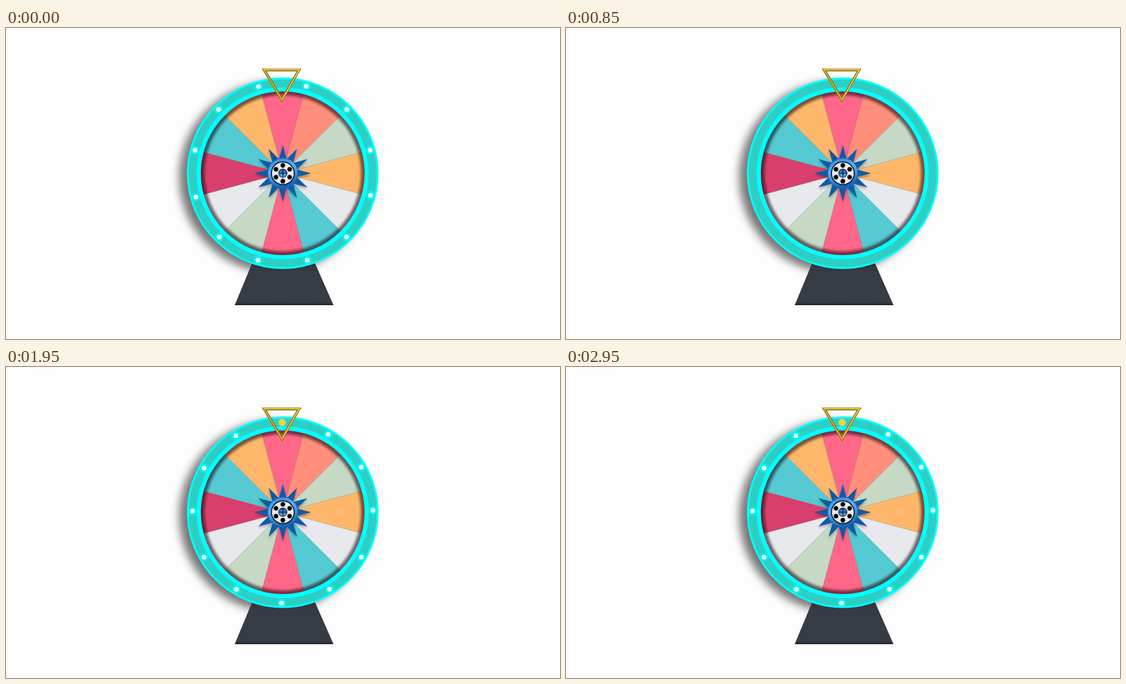
Recreate the animation shown at these times as an HTML page. Size 998 by 561 pixels, loop 3000 ms.

```html
<!DOCTYPE html>
<html lang="en">
<head>
<meta charset="utf-8">
<title>Prize wheel</title>
<style>
html, body { margin: 0; width: 100%; height: 100%; overflow: hidden; background: #fdfdfd; }
svg { display: block; width: 100vw; height: 100vh; }
</style>
</head>
<body>
<svg viewBox="0 0 998 561">
  <defs>
    <filter id="soft" x="-20%" y="-20%" width="140%" height="140%"><feGaussianBlur stdDeviation="8"/></filter>
    <filter id="rim" x="-20%" y="-20%" width="140%" height="140%"><feGaussianBlur stdDeviation="2.2"/></filter>
    <clipPath id="face"><circle cx="498.5" cy="262" r="147.5"/></clipPath>
    <linearGradient id="stand" x2="0" y2="1">
      <stop offset="0" stop-color="#31353e"/><stop offset=".2" stop-color="#373b45"/>
      <stop offset=".93" stop-color="#373b45"/><stop offset="1" stop-color="#1c2029"/>
    </linearGradient>
    <linearGradient id="hub" x2=".3" y2="1">
      <stop offset="0" stop-color="#2b82d9"/><stop offset=".45" stop-color="#5bb0fa"/><stop offset="1" stop-color="#1b62b4"/>
    </linearGradient>
    <linearGradient id="cap" x2="0" y2="1">
      <stop offset="0" stop-color="#27568f"/><stop offset="1" stop-color="#6cabe0"/>
    </linearGradient>
    <radialGradient id="glow">
      <stop offset=".4" stop-color="#00ffff"/><stop offset=".7" stop-color="#00ffff" stop-opacity=".6"/>
      <stop offset="1" stop-color="#00ffff" stop-opacity="0"/>
    </radialGradient>
  </defs>

  <circle cx="484" cy="269" r="172" fill="#000" opacity=".53" filter="url(#soft)"/>
  <path d="M443 425H557L590 500H412Z" fill="url(#stand)"/>

  <g transform="translate(498.5 262)">
    <circle r="172.7" fill="#00ffff"/>
    <circle r="169.3" fill="#2dcfc4"/>
    <circle r="155" fill="#00ffff"/>
    <g id="slices" stroke="#8a7a78" stroke-opacity=".35" stroke-width=".8"></g>
  </g>
  <g clip-path="url(#face)">
    <circle cx="498.5" cy="262" r="148" fill="none" stroke="#1c0c12" stroke-width="14" opacity=".6" filter="url(#rim)"/>
  </g>

  <g id="lightsA"></g>
  <g id="lightsB"></g>

  <g transform="translate(498.7 262)">
    <path class="star" fill="#000" opacity=".3" transform="translate(0 3)" filter="url(#rim)"/>
    <path class="star" fill="#0f5ba6"/>
    <circle r="27.3" fill="url(#hub)" stroke="#1a5ca8"/>
    <circle r="20.6" fill="#e9e9e9" stroke="#0c2138" stroke-width="2"/>
    <g id="holes" fill="#050505"></g>
    <circle r="7.6" fill="url(#cap)" stroke="#16304f" stroke-width="1.2"/>
    <path d="M-7 0H7M0 -7V7" stroke="#12294a" stroke-width="1.4"/>
  </g>

  <g fill="none" stroke-linejoin="miter">
    <path d="M465.2 75.7H527.8L497.2 129.5Z" stroke="#806a12" stroke-width="5"/>
    <path d="M464.7 75.1H528.3L497.2 130Z" stroke="#cdae28" stroke-width="2.6"/>
    <path d="M465 75.2H528L498 128.5" stroke="#f0da62" stroke-width="1.3"/>
  </g>
</svg>
<script>
const LOOP = 3000;
const byId = id => document.getElementById(id);

function add(parent, tag, attrs) {
  const node = document.createElementNS("http://www.w3.org/2000/svg", tag);
  for (const key in attrs) node.setAttribute(key, attrs[key]);
  parent.append(node);
}

// Angles run clockwise from the top.
function polar(radius, degrees) {
  const a = degrees * Math.PI / 180;
  return [radius * Math.sin(a), -radius * Math.cos(a)].map(v => v.toFixed(2));
}

const pink = "#ff6688", sage = "#c6d9c5", amber = "#ffb76b", pale = "#e7e9ec", aqua = "#55cad2";
[pink, "#ff8f7b", sage, amber, pale, aqua, pink, sage, pale, "#d83f6d", aqua, amber].forEach((fill, i) => {
  const from = polar(147.5, i * 30 - 15), to = polar(147.5, i * 30 + 15);
  add(byId("slices"), "path", { d: `M0 0L${from}A147.5 147.5 0 0 1 ${to}Z`, fill });
});

const starPoints = Array.from({ length: 24 }, (_, i) => polar(i % 2 ? 26 : 51, i * 15));
for (const star of document.querySelectorAll(".star")) star.setAttribute("d", `M${starPoints.join("L")}Z`);

for (let i = 0; i < 6; i++) {
  const [cx, cy] = polar(14.2, i * 60);
  add(byId("holes"), "circle", { cx, cy, r: 4.2 });
}

function addLights(group, points) {
  for (const [cx, cy] of points) {
    add(group, "circle", { cx, cy, r: 9.5, fill: "url(#glow)" });
    add(group, "circle", { cx, cy, r: 4.1, fill: "#fff" });
  }
}
addLights(byId("lightsA"), [
  [455, 106], [541, 105], [614, 147], [656, 220.5], [656.5, 302], [613.5, 377],
  [543, 419], [454, 419], [384.5, 377], [342, 305], [340.5, 220.5], [383, 147]
]);
addLights(byId("lightsB"), [
  [580.5, 121.5], [640, 180.5], [661, 258.5], [640, 343], [583, 401], [496.5, 426],
  [415, 401], [357, 343], [336, 260], [357, 182.5], [414, 124]
]);
add(byId("lightsB"), "circle", { cx: 497.5, cy: 100, r: 7.3, fill: "#a5d46f", opacity: .8 });
add(byId("lightsB"), "circle", { cx: 497.5, cy: 100, r: 5.8, fill: "#f5d04e" });

// Spans of time, in ms, during which each ring of lights is lit.
const litA = [[0, 400], [1200, 1800], [2500, 2850]];
const litB = [[1400, LOOP]];

function show(id, spans, t) {
  const lit = spans.some(([start, end]) => t >= start && t < end);
  byId(id).setAttribute("visibility", lit ? "visible" : "hidden");
}

function render(now) {
  const t = now % LOOP;
  show("lightsA", litA, t);
  show("lightsB", litB, t);
}

const begin = performance.now();
function tick() {
  render(performance.now() - begin);
  requestAnimationFrame(tick);
}
tick();
</script>
</body>
</html>
```
